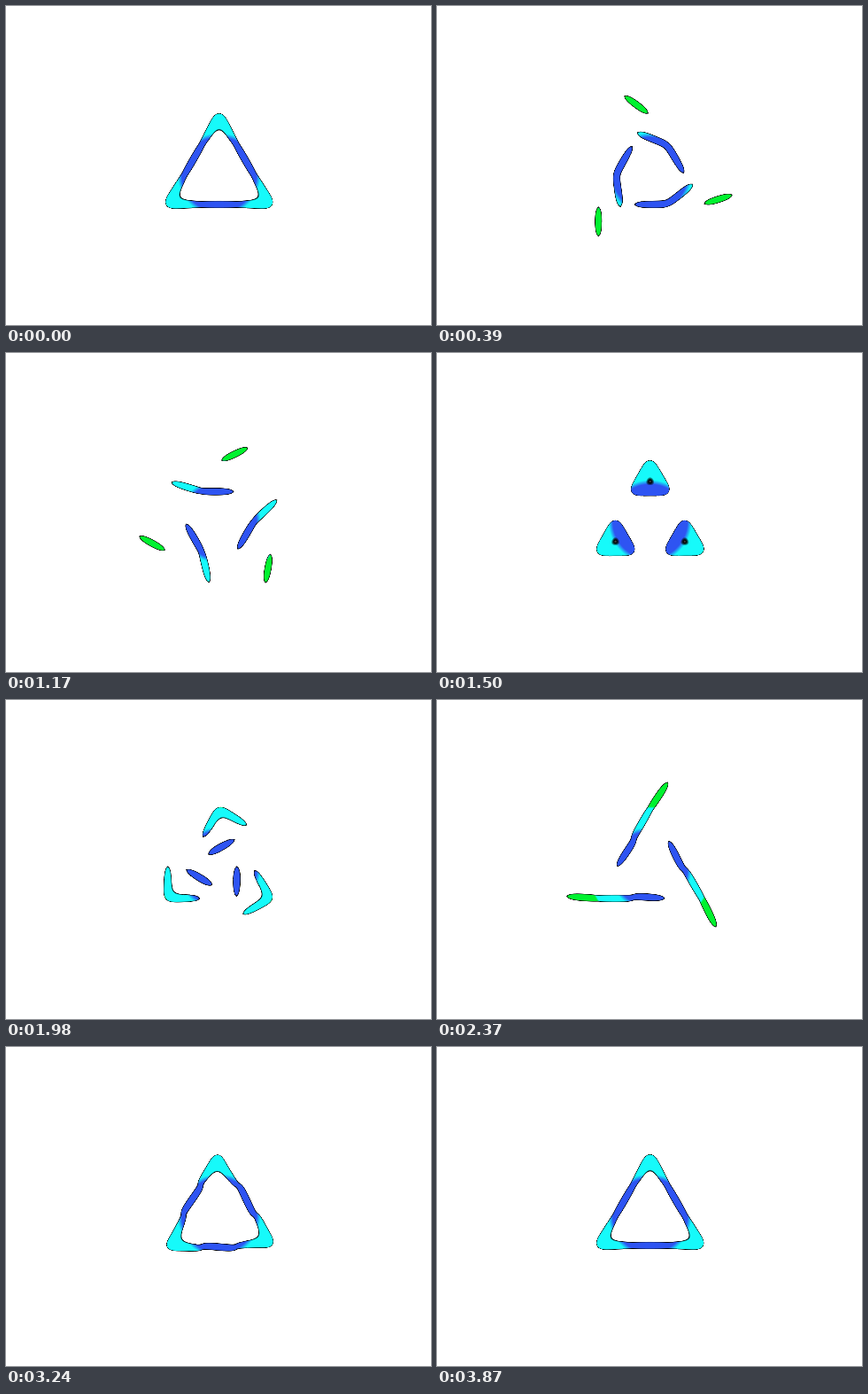
An HTML page with a canvas that plays this animation: 480x360 px, repeating every 3900 ms.

```html
<!DOCTYPE html>
<html lang="en">
<head>
<meta charset="utf-8">
<title>Nine turning bars</title>
<style>
  html, body { margin: 0; width: 100%; height: 100%; overflow: hidden; background: #fff; }
  canvas { display: block; }
</style>
</head>
<body>
<canvas id="stage" width="480" height="360"></canvas>
<script>
const LOOP = 3900, STEP = 30;
const CX = 240.7, CY = 190.2;          // centre of the figure
const LEN = 39, GAP = 0.5;             // lattice edge, bare part at each bar end
const SPAN = LEN - 2 * GAP;
const SAMPLES = 12, SPACING = SPAN / SAMPLES;
const DECAY = 5.3, REACH = 26;         // how far a bar's field spreads
const WEIGHT = 1.355 * SPACING / (2 * DECAY);
const BOX = { x: 140, y: 80, w: 204, h: 188 };
const BLUE = [46, 84, 242], CYAN = [22, 250, 250], GREEN = [0, 242, 48];

// Start and length of each of the four moves
const MOVES = [[0, 660], [875, 650], [1750, 700], [2625, 690]];

// Hinge (distance, direction) and the bar's direction in each pose, in degrees
const BARS = [
  { dist: LEN * Math.sqrt(3), dir: 90, poses: [240, 90, -60, 60, 240], skew: 10 },
  { dist: LEN, dir: 120, poses: [240, 240, 60, 60, 240], skew: 0 },
  { dist: LEN, dir: 60, poses: [120, 180, 180, 300, 120], skew: 0 }
];
const SKEW_SIGN = [0, 1, -1];

const ctx = document.getElementById('stage').getContext('2d');
const image = ctx.createImageData(BOX.w, BOX.h);

const clamp = v => Math.min(1, Math.max(0, v));
const ramp = (a, b, v) => clamp((v - a) / (b - a));
const mix = (a, b, k) => a + (b - a) * k;
const ease = k => (1 - Math.cos(Math.PI * clamp(k))) / 2;
const cosd = a => Math.cos(a * Math.PI / 180);
const sind = a => Math.sin(a * Math.PI / 180);

function barsAt(time) {
  const progress = MOVES.map(([start, length]) => ease((time - start) / length));
  const bars = [];
  for (let corner = 0; corner < 3; corner++) {
    const turn = corner * 120;
    for (const { dist, dir, poses, skew } of BARS) {
      const angles = poses.map((a, i) => a + turn + (i === 1 ? skew * SKEW_SIGN[corner] : 0));
      const angle = progress.reduce((a, k, i) => a + (angles[i + 1] - angles[i]) * k, angles[0]);
      const ux = cosd(angle), uy = -sind(angle);
      bars.push({
        x: CX + dist * cosd(dir + turn) + ux * GAP,
        y: CY - dist * sind(dir + turn) + uy * GAP,
        ux, uy
      });
    }
  }
  return bars;
}

// Field of evenly charged bars; the outline lies just below 1
function fieldAt(x, y, bars) {
  let sum = 0;
  for (const b of bars) {
    const dx = x - b.x, dy = y - b.y;
    const along = dx * b.ux + dy * b.uy;
    const across = dx * b.uy - dy * b.ux;
    const beyond = Math.max(0, -along, along - SPAN);
    const across2 = across * across;
    if (across2 + beyond * beyond > REACH * REACH) continue;
    for (let i = 0; i < SAMPLES; i++) {
      const d = along - (i + 0.5) * SPACING;
      sum += Math.exp(-Math.sqrt(d * d + across2) / DECAY);
    }
  }
  return sum * WEIGHT;
}

function draw(time) {
  const bars = barsAt(time), data = image.data;
  let p = 0;
  for (let j = 0; j < BOX.h; j++) {
    for (let i = 0; i < BOX.w; i++, p += 4) {
      const x = BOX.x + i + 0.5, y = BOX.y + j + 0.5;
      const field = fieldAt(x, y, bars);
      const cover = ramp(0.9, 0.95, field);    // white to black rim
      const fill = ramp(0.95, 1.05, field);    // black rim to colour
      const r = Math.hypot(x - CX, y - CY);
      const toCyan = ramp(42, 47, r), toGreen = ramp(68, 70, r);
      for (let c = 0; c < 3; c++) {
        const hue = mix(mix(BLUE[c], CYAN[c], toCyan), GREEN[c], toGreen);
        data[p + c] = mix(255, hue * fill, cover);
      }
      data[p + 3] = 255;
    }
  }
  ctx.putImageData(image, BOX.x, BOX.y);
}

let shown = -1;
function tick() {
  const time = Math.floor(performance.now() % LOOP / STEP) * STEP;
  if (time !== shown) draw(shown = time);
  requestAnimationFrame(tick);
}
tick();
</script>
</body>
</html>
```
